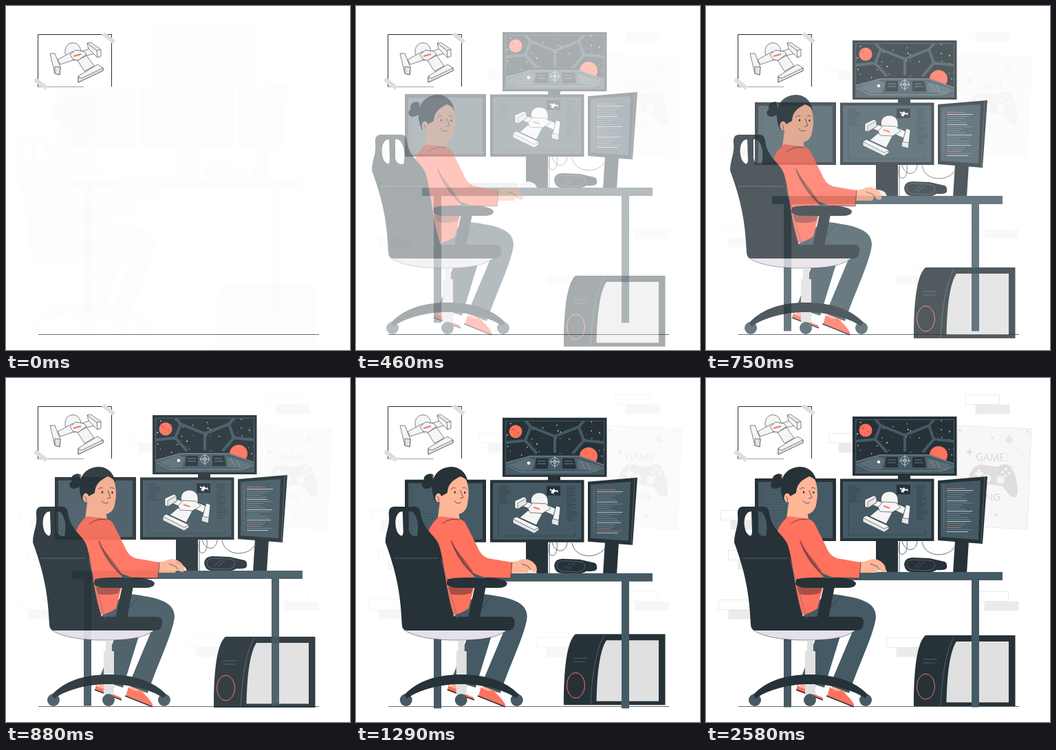
Recreate the animation shown at these times as an HTML page. Size 500 by 500 pixels, loop 3.12 s.

```html
<!DOCTYPE html>
<html lang="en">
<head>
<meta charset="utf-8">
<title>Game developer</title>
<style>
html, body { margin: 0; height: 100%; overflow: hidden; background: #fff; }
svg { display: block; width: 100vw; height: 100vh; }
.dark { fill: #263238; }
.slate { fill: #455a64; }
.coral { fill: #ff725e; }
.skin { fill: #ffb697; }
.pale { fill: #e0e0e0; }
.line { fill: none; stroke: #263238; stroke-width: .7; }
.frame { fill: none; stroke: #263238; }
.soft { fill: none; stroke: #607680; stroke-width: .7; }
.ship path { fill: #f5f5f5; stroke: #263238; stroke-width: .6; stroke-linejoin: round; }
.ship .shade { fill: #e4e5e6; }
.ship .stripe { fill: none; stroke: #ff725e; stroke-width: 2; }
</style>
</head>
<body>
<svg viewBox="0 0 500 500">
  <g id="backdrop" opacity="0">
    <g id="boxes"></g>
    <path d="M366 69L473 74 467 220 359 214Z" fill="#f7f7f7" stroke="#e6e6e6" stroke-width=".8"/>
    <g fill="#dedede">
      <circle cx="369" cy="76" r="1.8"/><circle cx="467" cy="78" r="1.8"/>
      <path d="M383 102l1.5 4 4 1.5-4 1.5-1.5 4-1.5-4-4-1.5 4-1.5zM421 196l1 2.500 2.500 1-2.500 1-1 2.500-1-2.500-2.500-1 2.500-1zM416 84l.8 2 2 .8-2 .8-.8 2-.8-2-2-.8 2-.8z"/>
      <path d="M434 90l7-8 6 9-6 5z" fill="#e8e8e8"/>
      <path d="M391 129Q400 123 407 127L424 129Q435 122 442 128C449 136 454 155 453 168Q449 178 440 169L431 157 405 154 395 160Q380 166 380 151Q383 136 391 129Z"/>
    </g>
    <g fill="#f5f5f5">
      <circle cx="408" cy="146" r="6"/><circle cx="428" cy="148" r="6"/>
      <path d="M391 137h4v-4h4v4h4v4h-4v4h-4v-4h-4z"/>
      <circle cx="436" cy="132" r="2"/><circle cx="441" cy="138" r="2"/><circle cx="435" cy="142" r="2"/><circle cx="431" cy="137" r="2"/>
    </g>
    <circle cx="450" cy="117" r="13" fill="none" stroke="#e8e8e8" stroke-width=".7"/>
    <g fill="#d8d8d8" font-family="'Open Sans', sans-serif" font-size="15">
      <text x="392" y="120" transform="rotate(1 392 120)">GAME</text>
      <text x="428" y="178" text-anchor="end">LOADING</text>
    </g>
  </g>

  <path d="M47 477.500H455" class="line"/>

  <g>
    <path d="M153.500 117V41.500H46.500V117.500" class="frame"/>
    <path d="M46.500 117.500H113" class="frame" opacity=".45"/>
    <g fill="#dedede"><path d="M143 38L159 50 155 55 139 42Z"/><path d="M44 104L61 117 57 122 40 109Z"/></g>
    <g class="ship">
      <path d="M86 69C84 50 107 48 109 66L105 78 92 79Z"/>
      <path d="M104 79L117 72 128 87 114 95Z"/>
      <path d="M75 78L97 66 102 77 79 85Z"/>
      <path d="M110 66L122 62 133 68 117 72Z"/>
      <path d="M93 71L101 64 113 66 117 70 105 79 98 78Z"/>
      <path d="M64 69L71 69 79 89 78 100 71 98Z"/><path d="M71 88L79 89 78 100 71 98Z" class="shade"/>
      <path d="M118 54L123 53 138 63 138 73 133 75 120 62Z"/><path d="M118 54L132 65 138 63M132 65L133 75" class="shade"/>
      <path d="M105 102L133 85 141 90 141 94 105 111Z"/><path d="M105 103L110 105 141 90 141 94 105 111Z" class="shade"/>
      <path d="M98 73L109 70" class="stripe"/>
    </g>
  </g>

  <g id="tower">
    <path d="M320 374H449.500V477H302C302 440 304 391 317 376Q318 374 320 374Z" class="dark"/>
    <path d="M364 383H440V471.500H349.500C350 440 353 399 364 383Z" class="pale"/>
    <path d="M361 376C349 394 343 434 341 476M316 409H336M316 414H333" class="soft"/>
    <ellipse cx="319.500" cy="448.500" rx="13" ry="18.500" fill="none" stroke="#ff725e"/>
  </g>

  <g id="desk">
    <path d="M279 140H297V149H279ZM213 56H364.500V142H213ZM71 146H189V237H71ZM195 146.500H331.500V237H195ZM247 235H279V284H247ZM362 236H382L379 284H359ZM337 149L409 143 402 241 337 236Z" class="dark"/>
    <path d="M76 151H184V233H76ZM199 150.500H327.500V233H199ZM341 153L399 149 396 235 341 231Z" class="slate"/>
    <path d="M405 144L400 240" class="soft"/>

    <svg x="217" y="60" width="144" height="79" viewBox="217 60 144 79">
      <g id="stars" fill="#fff"></g>
      <circle cx="232" cy="76" r="9.500" class="coral"/>
      <g fill="#e35d4b"><circle cx="228" cy="73" r="2"/><circle cx="236" cy="78" r="1.500"/><circle cx="231" cy="81" r="1"/></g>
      <circle cx="338" cy="112" r="13" class="coral"/>
      <path d="M246 60L254 69 289 83 324 69 332 60M289 83V107M254 69L246 89 263 108M324 69L331 89 315 108M217 92L246 89M361 92L331 89" fill="none" stroke="#455a64" stroke-width="4"/>
      <path d="M217 121L253 111H324L361 124V139H217Z" class="slate"/>
      <path d="M222 124L250 114 260 118 256 132 240 133ZM321 116L356 126 349 134 322 131Z" fill="#5b6d76"/>
      <path d="M262 115H279V130H260ZM300 115H317L320 130H300Z" class="dark"/>
      <path d="M217 122L253 112H324L361 125M219 125L238 135H343L360 128M264 119H276M264 123H276M303 119H314M303 123H316M326 119L333 130M335 121L341 132" fill="none" stroke="#a4afb4" stroke-width=".6"/>
      <path d="M217.500 60.500H360.500V138.500H217.500Z" fill="none" stroke="#455a64"/>
      <circle cx="251" cy="122" r="2.300" fill="#fff"/>
      <g fill="none" stroke="#c7ced1" stroke-width=".9"><circle cx="289" cy="120" r="6"/><circle cx="289" cy="120" r="2.500"/><path d="M281 120H297M289 112V129"/></g>
    </svg>

    <g id="code"></g>
    <path d="M207 155V228H319V222" class="line" opacity=".65"/>
    <path d="M277 155H297V169H277Z" class="dark"/>
    <path d="M282 159l3 2 3-2 2 3 3-1 1 4-3-2-4 2 1 2-5-2 2-3-3 0z" fill="#fff"/>
    <g class="ship">
      <path d="M255 181C250 161 279 160 279 177L279 192 256 193Z"/>
      <path d="M250 191L271 195 262 212 238 201Z"/>
      <path d="M244 177L257 181 251 188 241 184Z"/>
      <path d="M276 182L290 188 287 198 274 192Z"/>
      <path d="M250 188L257 180 276 181 283 188 271 195 253 194Z"/>
      <path d="M231 177L244 171 248 173 248 181 235 189 231 187Z"/><path d="M235 180L248 173 248 181 235 189Z" class="shade"/>
      <path d="M291 184L297 186 294 213 284 210Z"/><path d="M285 203L295 205 294 213 284 210Z" class="shade"/>
      <path d="M228 203L233 200 265 215 266 219 259 224 228 209Z"/><path d="M228 203L259 219 266 216 266 219 259 224 228 209Z" class="shade"/>
      <path d="M258 186L267 189" class="stripe"/>
    </g>

    <path d="M282 237C278 252 282 258 287 256S293 244 292 237M285 237C289 254 306 253 307 237M281 239V282M314 238C318 262 352 261 361 246" class="line"/>
    <path d="M288 271Q289 261 300 261L325 262 347 267Q351 269 350 276Q348 280 335 279Q330 283 318 283L298 282Q289 281 288 271Z" class="dark"/>
    <path d="M292 270Q293 264 302 264L326 265Q335 267 332 275Q329 280 318 280L300 279Q292 278 292 270ZM303 275L312 267M308 276L318 267" class="soft"/>
    <path d="M96 282H431V294H96ZM113 294H124V478.500H113ZM386 294H397V478.500H386Z" class="slate"/>
    <path d="M163 275H235V282H163Z" class="pale"/>
    <path d="M237 282Q239 274 250 273Q261 274 263 282Z" fill="#ededed"/>
  </g>

  <g id="person">
    <path d="M139 438L160 447 157 458 136 452Z" class="skin"/>
    <path d="M162 372H196L172 450 137 439Z" class="slate"/>
    <path d="M133 446Q140 453 147 451Q157 461 169 464L170 468 131 454Z" class="coral"/>
    <path d="M184 445L205 455 201 461 181 456Z" class="skin"/>
    <path d="M141 346L175 313C215 318 247 322 247 347C245 370 222 417 208 458L180 447 214 366H141Z" class="slate"/>
    <path d="M180 449Q188 457 197 454Q210 465 215 474L215 478 176 463Z" class="coral"/>
    <path d="M175 462L215 478M131 453L170 468" class="frame" stroke-width="1.500"/>
    <path d="M181 334L195 318" class="line"/>

    <path d="M121 173L117 205Q135 211 149 206L147 192Z" class="skin"/>
    <path d="M120 201Q133 203 148 204L174 252 170 303 162 335Q152 342 141 344L128 340 100 237Q104 212 120 201Z" class="coral"/>
    <path d="M132 304H169L165 313Q150 317 136 314Z" fill="#a84f48"/>
    <path d="M223 267Q231 268 238 264Q249 261 257 269Q262 274 261 281L257 282 250 278 248 283 222 283Z" class="skin"/>
    <path d="M135 214Q150 198 158 212L174 244Q179 258 190 262L225 268 223 291 172 290Q156 282 146 265Z" class="coral"/>
    <path d="M135 235C145 263 158 278 173 290C160 266 147 256 135 235Z" fill="#a84f48"/>
    <path d="M225 268L223 291 173 290M137 236C146 259 158 274 173 290M123 212Q135 203 148 206M239 270L249 274 252 279" class="line"/>

    <path d="M124 151Q140 136 157 144Q162 154 162 171L160 185Q157 197 146 198Q130 197 121 185Z" class="skin"/>
    <path d="M109 158C95 167 90 153 98 150C93 143 105 136 111 141Z" class="dark"/>
    <path d="M109 141l3 8" stroke="#ff725e"/>
    <path d="M114 180C104 160 107 131 136 129C151 129 160 140 161 153Q158 145 150 143C138 149 132 154 131 167L122 172Z" class="dark"/>
    <ellipse cx="118" cy="174" rx="4.500" ry="6.500" class="skin"/>
    <ellipse cx="142" cy="166" rx="1.200" ry="1.700" class="dark"/><ellipse cx="156.500" cy="166.500" rx="1.100" ry="1.700" class="dark"/>
    <path d="M136 162Q139 158 143 160M153 160Q156 158 159 161M150 163L154 174 149 175M116 172Q120 174 118 179M141 178Q144 184 151 181" class="line"/>

    <path d="M68 366H218C204 378 180 381 145 381S82 376 68 366Z" fill="#e4e1e8" stroke="#263238" stroke-width=".5"/>
    <path d="M147 381H156V397H147ZM144 397H159V460H144Z" class="pale"/>
    <g class="slate"><circle cx="71" cy="468" r="9"/><circle cx="151" cy="468" r="9"/><circle cx="232" cy="468" r="9"/></g>
    <path d="M69 460C88 440 116 431 151 431S216 440 235 460L231 465C211 452 180 445 151 445S92 452 72 466Z" class="dark"/>
    <path fill-rule="evenodd" class="dark" d="M41 239C41 223 48 215 46 199Q45 187 54 187H84Q91 187 92 196C95 218 109 226 116 237C126 252 126 300 141 347H221Q229 347 229 355Q229 367 219 367H73Q65 367 65 358C63 310 56 280 41 239ZM66 194C55 194 53 213 59 225Q66 234 67 224ZM75 194V221Q77 231 87 230Q91 209 83 197Q80 193 75 194Z"/>
    <path d="M53 262H118M122 263L146 350" class="soft"/>
    <path d="M171 303H187L178 349H161Z" class="dark"/>
    <path d="M131 293Q137 290 160 290H195Q218 293 218 299Q217 305 204 305L150 305Q132 305 130 299Z" class="dark"/>
    <path d="M167 283L187 291 172 291Z" class="slate"/>
  </g>
</svg>
<script>
const LOOP = 3120, SLIDE = 1500, LEAD = 45, DISTANCE = 30;
const byId = id => document.getElementById(id);

function add(parent, tag, attrs) {
  const node = document.createElementNS("http://www.w3.org/2000/svg", tag);
  for (const key in attrs) node.setAttribute(key, attrs[key]);
  byId(parent).append(node);
}

let seed = 11;
const random = () => (seed = seed * 16807 % 2147483647) / 2147483647;

// Outlined box with a filled box below and to the right.
for (const [x, y] of [[377, 24], [178, 80], [21, 192], [32, 250], [18, 322], [390, 310], [262, 377]]) {
  add("boxes", "rect", { x: x + .5, y: y + .5, width: 49, height: 14, fill: "#fff", stroke: "#e6e6e6", "stroke-width": .8 });
  add("boxes", "rect", { x: x + 14.500, y: y + 14.500, width: 50, height: 14, fill: "#ebebeb" });
}

for (let i = 0; i < 46; i++)
  add("stars", "circle", { cx: 218 + random() * 142, cy: 62 + random() * 50, r: .4 + random() * .5 });

function textBlock(x, y, rows, step, width, colour) {
  for (let i = 0; i < rows; i++)
    add("code", "path", {
      d: `M${x} ${y + i * step}h${width * (.45 + random() * .55)}`,
      stroke: typeof colour === "function" ? colour(i) : colour, "stroke-width": .7
    });
}
textBlock(84, 158, 18, 4, 75, "#52666f");
textBlock(209, 156, 10, 2.600, 17, "#2c3a41");
textBlock(306, 156, 20, 2.600, 16, "#2c3a41");
textBlock(350, 160.500, 22, 3, 38, i => i === 0 || i === 19 ? "#ff725e" : i % 5 === 1 ? "#eef1f2" : "#7d8e96");
textBlock(345, 157, 23, 3, 2, "#94a2a9");

// cubic-bezier(.36, -.01, .5, 1.38)
function ease(x) {
  if (x >= 1) return 1;
  const curve = (s, a, b) => 3 * a * s * (1 - s) ** 2 + 3 * b * s * s * (1 - s) + s ** 3;
  let low = 0, high = 1;
  for (let i = 0; i < 24; i++) {
    const mid = (low + high) / 2;
    if (curve(mid, .36, .5) < x) low = mid; else high = mid;
  }
  return curve(low, -.01, 1.38);
}

function draw(now) {
  const t = now % LOOP;
  const shown = ease((t + LEAD) / SLIDE);
  const shift = DISTANCE * (1 - shown);
  for (const [id, dx, dy] of [["tower", 0, 1], ["desk", 0, -1], ["person", -1, 0]]) {
    byId(id).setAttribute("transform", `translate(${dx * shift} ${dy * shift})`);
    byId(id).setAttribute("opacity", Math.max(0, Math.min(1, shown)));
  }
  byId("backdrop").setAttribute("opacity", t < 2580 ? Math.min(t, 1460) / 2900 : 1);
}

const start = performance.now();
function tick() {
  draw(performance.now() - start);
  requestAnimationFrame(tick);
}
tick();
</script>
</body>
</html>
```
